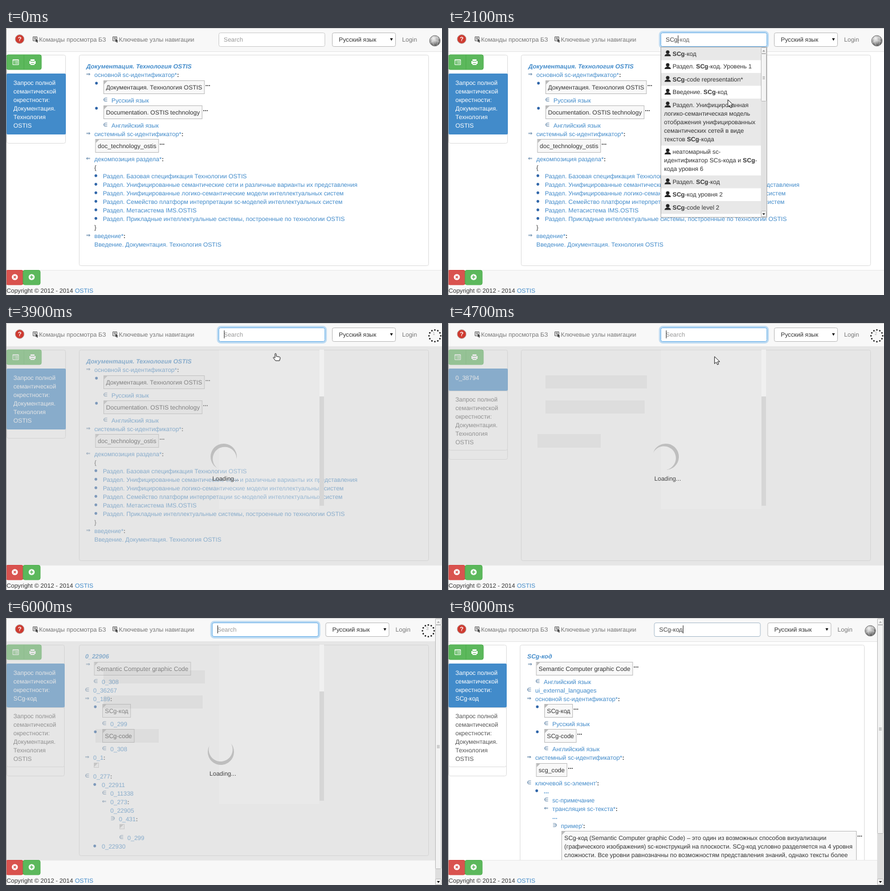
Recreate the animation shown at these times as an HTML page. Size 765x469 px, loop 8100 ms.

```html
<!DOCTYPE html>
<html lang="ru">
<head>
<meta charset="utf-8">
<title>Semantic search</title>
<style>
  html, body { margin: 0; width: 100%; height: 100%; overflow: hidden; background: #fff; }
  svg { display: block; width: 765px; height: 469px; }
  text { font: 10.69px "Liberation Sans", Arial, sans-serif; text-rendering: geometricPrecision; white-space: pre; }
  .b { font-weight: bold; }
  .bi { font-weight: bold; font-style: italic; }
  .mark { font: 9px "DejaVu Sans", sans-serif; }
</style>
</head>
<body>
<script>
const LINK = '#428bca', INK = '#333', GREY = '#777', LOOP = 8100;

const pen = document.createElement('canvas').getContext('2d');
pen.font = '10.69px "Liberation Sans", Arial, sans-serif';
pen.textRendering = 'geometricPrecision';
const widthOf = s => pen.measureText(s).width;

// Drawing helpers; text is placed by the vertical middle of its line.
const text = (x, y, s, fill = INK, cls = '') =>
  `<text x="${x}" y="${y + 3.7}" fill="${fill}" class="${cls}">${s}</text>`;
const lines = (x, y, list, fill) => list.map((s, i) => text(x, y + 15 * i, s, fill)).join('');
const rect = (x1, y1, x2, y2, fill, stroke = 'none', r = 0) =>
  `<rect x="${x1}" y="${y1}" width="${x2 - x1}" height="${y2 - y1}" fill="${fill}" stroke="${stroke}" rx="${r}"/>`;
const frame = (x1, y1, x2, y2, stroke = '#ddd', fill = '#fff', r = 3) =>
  rect(x1 + .5, y1 + .5, x2 - .5, y2 - .5, fill, stroke, r);
const path = (d, fill, stroke = 'none', w = 1) =>
  `<path d="${d}" fill="${fill}" stroke="${stroke}" stroke-width="${w}"/>`;
const circle = (x, y, r, fill, stroke = 'none') =>
  `<circle cx="${x}" cy="${y}" r="${r}" fill="${fill}" stroke="${stroke}"/>`;
const group = (id, body) => `<g id="${id}">${body}</g>`;

const marker = (x, y, m) => !m ? '' : m === '•'
  ? circle(x - 12.3, y - .5, 2.4, '#2d64a8')
  : text(x - 14.5, y - 2, m, '#33628f', 'mark');
const corner = (x, y) => path(`M${x + 1} ${y + 1}h6l-6 6z`, '#bbb');

function link(x, y, m, s, cls = '') {
  const label = s.endsWith(':') ? `${s.slice(0, -1)}<tspan fill="${INK}" class="b">:</tspan>` : s;
  return marker(x, y, m) + text(x, y, label, LINK, cls);
}
function box(x, y, m, s, dots = true) {
  const right = x + widthOf(s) + 9;
  return marker(x, y - 6.5, m) + frame(x, y - 12, right, y + 12, '#bbb', '#f8f8f8', 0) + corner(x, y - 12) +
    text(x + 4.5, y, s) + (dots ? text(right + 1, y - 6, '...', '#111', 'b') : '');
}

const REQUEST = ['Запрос полной', 'семантической', 'окрестности:'];
const DOC_REQUEST = [...REQUEST, 'Документация.', 'Технология', 'OSTIS'];
const SCG_REQUEST = [...REQUEST, 'SCg-код'];

function sidebar(right, active, bottom, older) {
  const end = older ? bottom + 105 : bottom;
  return frame(1, 47, right, end + 16) +
    (older ? frame(1, bottom, right, end) + lines(13, bottom + 15, older, '#555') : '') +
    rect(1, 80, right, bottom, LINK, 'none', 2) + lines(13, 96, active, '#fff') +
    rect(1, 47, 62, 73, '#5cb85c', '#4cae4c', 3) + path('M31.5 47v26', 'none', '#4cae4c') +
    path('M12 55.5h10v9h-10zM12 57h10M14 59.5h1M16 59.5h5M14 62h1M16 62h5', 'none', '#fff') +
    path('M43 55h7v3h2v5h-2v2h-7v-2h-2v-5h2z', '#fff') + path('M43 58.5h7M44 62.5h5', 'none', '#5cb85c');
}

const docPage = () => [
  link(141, 67, '', 'Документация. Технология OSTIS', 'bi'),
  link(155, 82, '⇒', 'основной sc-идентификатор*:'),
  box(171, 104, '•', 'Документация. Технология OSTIS'),
  link(185, 127, '∈', 'Русский язык'),
  box(171, 148, '•', 'Documentation. OSTIS technology'),
  link(185, 171, '∈', 'Английский язык'),
  link(155, 186, '⇒', 'системный sc-идентификатор*:'),
  box(156.5, 207, '', 'doc_technology_ostis'),
  link(155, 230, '⇐', 'декомпозиция раздела*:'),
  text(155, 245, '{'),
  ...['Базовая спецификация Технологии OSTIS',
    'Унифицированные семантические сети и различные варианты их представления',
    'Унифицированные логико-семантические модели интеллектуальных систем',
    'Семейство платформ интерпретации sc-моделей интеллектуальных систем',
    'Метасистема IMS.OSTIS',
    'Прикладные интеллектуальные системы, построенные по технологии OSTIS'
  ].map((s, i) => link(170, 260 + 15 * i, '•', 'Раздел. ' + s)),
  text(155, 350, '}'),
  link(155, 365, '⇒', 'введение*:'),
  link(155, 380, '', 'Введение. Документация. Технология OSTIS')
].join('');

// The upper half has one layout whether identifiers or names are shown.
const scgTop = (n, dots) => [
  link(139, 67, '', n[0], 'bi'),
  box(154.5, 89, '⇒', 'Semantic Computer graphic Code', dots),
  link(168, 112, '∈', n[1]),
  link(153, 127, '∈', n[2]),
  link(153, 142, '⇒', n[3]),
  box(169, 163, '•', 'SCg-код', dots),
  link(183, 186, '∈', n[4]),
  box(169, 207, '•', 'SCg-code', dots),
  link(183, 230, '∈', n[1]),
  link(153, 245, '⇒', n[5])
].join('');

const emptyBox = (x, y) => frame(x, y, x + 9, y + 9, '#ccc', '#f8f8f8', 0) + corner(x, y);

const idPage = () => scgTop(['0_22906', '0_308', '0_36267', '0_189:', '0_299', '0_1:'], false) + [
  emptyBox(154, 254),
  link(153, 278, '∈', '0_277:'),
  link(168, 293, '•', '0_22911'),
  link(183, 308, '∈', '0_11338'),
  link(183, 323, '⇐', '0_273:'),
  link(183, 338, '', '0_22905'),
  link(198, 353, '∋', '0_431:'),
  emptyBox(199, 362),
  link(213, 386, '∈', '0_299'),
  link(168, 401, '•', '0_22930')
].join('');

const scgPage = () => scgTop(['SCg-код', 'Английский язык', 'ui_external_languages',
  'основной sc-идентификатор*:', 'Русский язык', 'системный sc-идентификатор*:'], true) + [
  box(154.5, 267, '', 'scg_code'),
  link(153, 290, '∈', "ключевой sc-элемент':"),
  link(168, 304, '•', '...', 'b'),
  link(183, 320, '∈', 'sc-примечание'),
  link(183, 335, '⇐', 'трансляция sc-текста*:'),
  link(183, 349, '', '...', 'b'),
  link(198, 365, '∋', "пример':"),
  frame(199, 374, 717, 450, '#bbb', '#f8f8f8', 0), corner(199, 374),
  lines(204, 386, ['SCg-код (Semantic Computer graphic Code) – это один из возможных способов визуализации',
    '(графического изображения) sc-конструкций на плоскости. SCg-код условно разделяется на 4 уровня',
    'сложности. Все уровни равнозначны по возможностям представления знаний, однако тексты более']),
  text(718, 380, '...', '#111', 'b')
].join('');

function suggestions() {
  const items = [['SCg-код'], ['Раздел. SCg-код. Уровень 1'], ['SCg-code representation*'], ['Введение. SCg-код'],
    ['Раздел. Унифицированная', 'логико-семантическая модель', 'отображения унифицированных',
      'семантических сетей в виде', 'текстов SCg-кода'],
    ['неатомарный sc-', 'идентификатор SCs-кода и SCg-', 'кода уровня 6'],
    ['Раздел. SCg-код'], ['SCg-код уровня 2'], ['SCg-code level 2']];
  let y = 34, out = frame(373, 33, 560, 333, '#aaa', '#fff', 0);
  items.forEach((item, i) => {
    const h = 7.5 + 15 * item.length;
    if (i % 2 === 0) out += rect(374, y, 549, y + h, '#e8e8e8');
    out += circle(385.5, y + 8.3, 3.1, '#222') + path(`M380 ${y + 15.5}q0 -3 4 -4h3q4 1 4 4z`, '#222');
    item.forEach((s, k) => out += text(k ? 379 : 394, y + 11.2 + 15 * k, s.replace('SCg', '<tspan class="b">SCg</tspan>')));
    y += h;
  });
  return out + rect(549, 34, 559, 332, '#e2e2e2') + frame(549, 34, 559, 45, '#bbb', '#f4f4f4', 1) +
    frame(549, 45, 559, 129, '#bbb', '#f4f4f4', 1) + frame(549, 321, 559, 332, '#bbb', '#f4f4f4', 1) +
    path('M551.5 41.5l2.5 -3l2.5 3z', '#999') + path('M551.5 325.5h5l-2.5 3z', '#222') +
    path('M552 85.5h4M552 87.5h4M552 89.5h4', 'none', '#aaa');
}

const menuIcon = x => path(`M${x + .5} 15.5h7v7h-7zM${x + 2} 17.5h4M${x + 2} 19.5h4`, '#fff', '#555') +
  path(`M${x + 5} 19l5 4l-2 .3l1 2l-1.5 .4l-1 -2l-1.5 1z`, '#444');

const tools = () =>
  group('glow', rect(372, 7, 561, 34, 'none', '#66afe9" stroke-width="4" opacity=".4', 5)) +
  '<rect id="field" x="373.5" y="8.5" width="186" height="24" rx="3" fill="#fff"/>' +
  group('query', '') + frame(572, 8, 684, 33, '#bbb') + text(584, 20, 'Русский язык') +
  path('M673.8 18h5l-2.5 4.5z', '#111') + text(695, 20, 'Login', GREY) +
  group('globe', circle(752.5, 22.5, 9.3, 'url(#metal)', '#777') +
    path('M744 20q8 -7 17 -1M744 26q9 -7 17 -1M750 14q-4 8 1 17M756 14q4 8 0 17', 'none', '#fff6')) +
  group('busy', group('dots', Array.from({ length: 12 }, (_, i) => {
    const a = i * Math.PI / 6;
    return circle(10.3 * Math.cos(a), 10.3 * Math.sin(a), 1.3, '#111');
  }).join('')) + '<text id="count" x="748.5" y="21" fill="#aaa" style="font-size:8px"></text>') +
  group('list', suggestions());

document.body.innerHTML = `<svg viewBox="0 0 765 469">
<defs><radialGradient id="metal" cx=".4" cy=".3" r=".75">
  <stop offset="0" stop-color="#f4f4f4"/><stop offset=".5" stop-color="#aaa"/><stop offset="1" stop-color="#444"/>
</radialGradient></defs>` +
  rect(0, 0, 765, 469, '#fff') +
  group('docFrame', frame(128, 47, 742, 418)) +
  group('docView', sidebar(105, DOC_REQUEST, 187) + docPage()) +
  group('blankView', sidebar(105, ['0_38794'], 119, DOC_REQUEST)) +
  group('idView', sidebar(103, SCG_REQUEST, 157, DOC_REQUEST) + idPage()) +
  group('scgView', frame(126, 47, 731, 480) + sidebar(103, SCG_REQUEST, 157, DOC_REQUEST) + scgPage()) +
  group('loading', rect(0, 41, 765, 425, 'rgba(205,205,205,.5)') +
    rect(374, 47, 550, 327, '#fff2') + rect(550, 47, 558, 129, '#f0f0f0') + rect(550, 129, 558, 321, '#d6d6d6') +
    group('residue', [[171, 92, 349, 115], [171, 136, 345, 159], [157, 195, 268, 219]]
      .map(r => rect(...r, '#0000000a')).join('')) +
    group('wheel', group('arc', path('M-13.2 -18.8A23 23 0 1 1 -13.2 18.8A20.95 20.95 0 1 0 -13.2 -18.8z', '#bebebe')) +
      text(-20, 38, 'Loading...', '#444'))) +
  rect(0, 0, 765, 41, '#f8f8f8') + rect(0, 41, 765, 42, '#e4e4e4') +
  circle(24, 19.5, 7.8, '#cf3a30', '#b9a8a5') + text(20.7, 19.5, '?', '#fff', 'b') +
  menuIcon(47) + text(58, 20, 'Команды просмотра БЗ', GREY) +
  menuIcon(187) + text(198, 20, 'Ключевые узлы навигации', GREY) +
  group('tools', tools()) +
  rect(0, 425, 765, 469, '#f8f8f8') + rect(0, 425, 765, 426, '#e7e7e7') +
  rect(0, 425.5, 30, 451, '#d9534f', '#d43f3a', 3) + rect(30, 425.5, 60, 451, '#5cb85c', '#4cae4c', 3) +
  circle(15.5, 437.5, 5.3, '#fff') + path('M13.5 435.5l4 4M17.5 435.5l-4 4', 'none', '#d9534f', 1.6) +
  circle(45, 437.5, 5.3, '#fff') + path('M42 437.5h6M45 434.5v6', 'none', '#5cb85c', 1.6) +
  text(1, 461, 'Copyright © 2012 - 2014') + text(121, 461, 'OSTIS', LINK) +
  group('scroll', rect(753, 0, 765, 469, '#dedede') + frame(753, 1, 764, 12, '#bbb', '#f4f4f4', 1) +
    path('M756 8.5l2.7 -3l2.7 3z', '#aaa') +
    '<rect id="thumb" x="753.5" y="12.5" width="10" rx="1" fill="#f2f2f2" stroke="#bbb"/>' +
    group('grip', path('M756 -2.5h5M756 -.5h5M756 1.5h5', 'none', '#aaa')) +
    frame(753, 458, 764, 469, '#bbb', '#f4f4f4', 1) + path('M756 462h5.4l-2.7 3.5z', '#111')) +
  rect(0, 0, 1, 469, '#999') + rect(0, 0, 765, 1, '#ccc') +
  group('pointer',
    group('arrow', path('M0 0v12.5l3 -2.7l2 4.4l2.2 -1l-2 -4.2h4z', '#fff', '#222')) +
    group('beam', path('M-2 -6h4M-2 6h4M0 -6v12', 'none', '#222')) +
    group('hand', path('M-1 0q1.5 -1.3 2.2 .5v4l5.5 1q1.8 .5 1.4 2.5l-1.2 4.2h-7l-4 -5q0 -1.5 1.6 -1l1.5 1.2z', '#fff', '#222'))) +
  '</svg>';

const el = id => document.getElementById(id);
const show = (id, on) => { el(id).style.display = on ? '' : 'none'; };
const move = (id, value) => el(id).setAttribute('transform', value);

// Interpolates rows of [time, ...values].
function along(keys, t, ease = u => u) {
  let i = 0;
  while (i < keys.length - 2 && t >= keys[i + 1][0]) i++;
  const [a, b] = [keys[i], keys[i + 1]];
  const u = ease(Math.min(1, Math.max(0, (t - a[0]) / (b[0] - a[0]))));
  return a.slice(1).map((v, k) => v + (b[k + 1] - v) * u);
}
const smooth = u => u * u * (3 - 2 * u);

const POINTER = [[100, 300, 452], [900, 468, 20], [1700, 468, 20], [2100, 491, 126], [2500, 491, 126],
  [3500, 474, 46], [3900, 473, 54], [4500, 473, 54], [5300, 439, 86], [5700, 439, 86]];
const WHEEL = [[3700, 136], [3900, 245], [5300, 1010], [6000, 1525], [6400, 1745]];

function queryAt(t) {
  if (t < 1200) return ['', ''];
  if (t < 1600) return [t < 1400 ? 'S' : 'SC', ''];
  if (t < 3700) return ['SCg', '-код'];
  return [t < 7400 ? '' : 'SCg-код', ''];
}

function render(t) {
  const loading = t >= 3700 && t < 6400, narrow = t >= 5700, focused = t >= 1000 && t < 7400;
  show('docFrame', t < 6200);
  show('docView', t < 4600);
  show('blankView', t >= 4600 && t < 5700);
  show('idView', t >= 5700 && t < 6200);
  show('scgView', t >= 6200);
  show('loading', loading);
  show('residue', t >= 4600 && t < 6200);
  show('globe', !loading);
  show('busy', loading);
  show('list', t >= 1600 && t < 3700);
  show('scroll', narrow);
  show('glow', focused);

  move('tools', `translate(${narrow ? -11.5 : 0})`);
  move('wheel', `translate(${narrow ? 377 : 382} 235)`);
  move('arc', `rotate(${along(WHEEL, t)[0]})`);
  move('dots', `translate(752.5 22.5) rotate(${Math.floor(t / 100) * 30})`);
  el('count').textContent = t < 4700 ? 1 : t < 5700 ? 2 : 3;

  const [typed, hint] = queryAt(t);
  const caret = 382.5 + widthOf(typed);
  el('field').setAttribute('stroke', focused ? '#66afe9' : t < 1000 ? '#ccc' : '#a9bccb');
  el('query').innerHTML = (typed ? text(382, 20, typed, '#444') + text(caret, 20, hint, '#666')
    : text(382, 20, 'Search', '#999')) +
    (t >= 1000 ? rect(caret, 13, caret + 1, 27, '#333') : '');

  const thumbHeight = t < 6200 ? 428 : 366;
  el('thumb').setAttribute('height', thumbHeight);
  move('grip', `translate(0 ${12.5 + thumbHeight / 2})`);

  const [x, y] = along(POINTER, t, smooth);
  const hand = t >= 3500 && t < 4600, beam = !hand && y < 33;
  show('pointer', t >= 100 && t < 5700);
  show('hand', hand);
  show('beam', beam);
  show('arrow', !hand && !beam);
  move('pointer', `translate(${x} ${y})`);
}

function tick() {
  render(Math.floor(performance.now() % LOOP / 100) * 100);
  requestAnimationFrame(tick);
}
tick();
</script>
</body>
</html>
```
